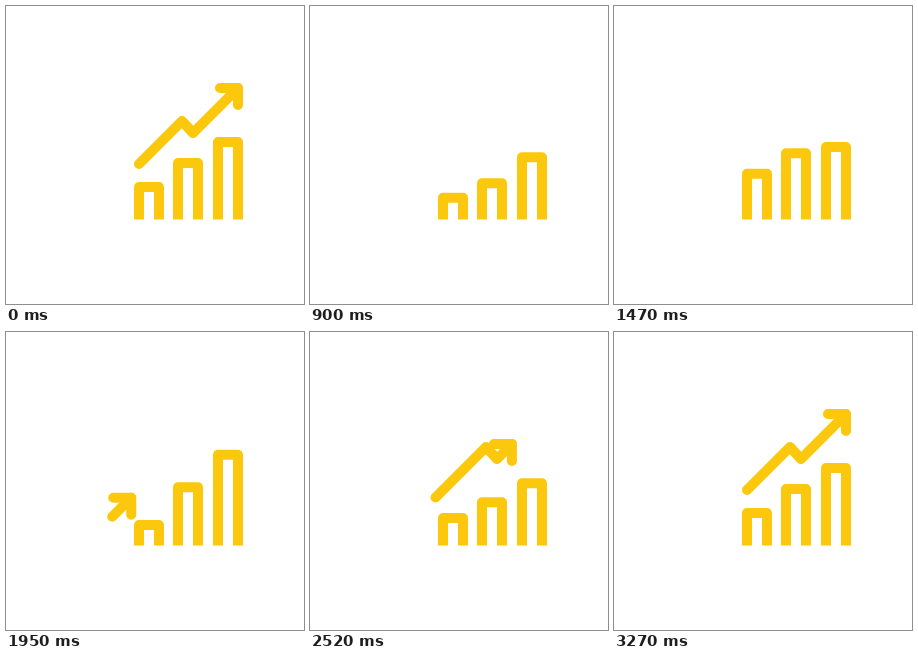
Recreate the animation shown at these times as an HTML page. Size 298 px wide and 298 px high, loop 3.6 s.

```html
<!DOCTYPE html>
<html lang="en">
<head>
<meta charset="utf-8">
<title>Growth chart</title>
<style>
  html, body { margin: 0; height: 100%; overflow: hidden; background: #fff; }
  svg { display: block; width: 100vw; height: 100vh; }
  path { fill: none; stroke: #fcc80d; stroke-width: 10; stroke-linejoin: round; }
  #arrow path { stroke-linecap: round; }
</style>
</head>
<body>
<svg viewBox="0 0 298 298">
  <path class="bar"/>
  <path class="bar"/>
  <path class="bar"/>
  <g id="arrow">
    <path id="shaft" d="M106 185L176 115L187 127L268 46"/>
    <path id="head" d="M-18 0H0V17"/>
  </g>
</svg>
<script>
const LOOP = 3600, STEP = 30, LAG = 240;
const $ = id => document.getElementById(id);
const arrow = $('arrow'), shaft = $('shaft'), head = $('head');
const barPaths = document.querySelectorAll('.bar');

// left and top of each bar's centre line at rest
const bars = [[133, 181], [172, 157], [212, 136]];
// time and vertical offset of the bars' shared wave
const wave = [[0, 0], [630, 20.5], [1400, -14], [2110, 16], [2760, 0]];

// distances along the shaft's route
const END = shaft.getTotalLength();
const REST_TAIL = 38.2, REST_TIP = 178.9, ENTRY_TIP = 26;
const EXIT_END = 780, ENTRY = 1900, ENTRY_END = 2850;

const mix = (a, b, k) => a + (b - a) * k;

function ease(t, from, to) {
  const x = Math.min(1, Math.max(0, (t - from) / (to - from)));
  return x * x * (3 - 2 * x);
}

function offset(t) {
  let y = 0;
  for (let i = 1; i < wave.length; i++) {
    const [t0, y0] = wave[i - 1], [t1, y1] = wave[i];
    y += (y1 - y0) * ease(t, t0, t1);
  }
  return y;
}

function drawArrow(t) {
  const visible = t < EXIT_END || t >= ENTRY;
  arrow.style.display = visible ? '' : 'none';
  if (!visible) return;
  let tail, tip;
  if (t < EXIT_END) {
    const k = ease(t, 0, EXIT_END);
    tail = mix(REST_TAIL, END, k);
    tip = mix(REST_TIP, END, k);
  } else {
    const k = ease(t, ENTRY, ENTRY_END);
    tail = mix(0, REST_TAIL, k);
    tip = mix(ENTRY_TIP, REST_TIP, k);
  }
  const p = shaft.getPointAtLength(tip);
  shaft.setAttribute('stroke-dasharray', `${tip - tail} 999`);
  shaft.setAttribute('stroke-dashoffset', -tail);
  head.setAttribute('transform', `translate(${p.x} ${p.y})`);
}

function draw(now) {
  const t = Math.floor(now % LOOP / STEP) * STEP;
  bars.forEach(([x, top], i) => {
    const y = top + offset(t - i * LAG);
    barPaths[i].setAttribute('d', `M${x} 213.5V${y}h20V213.5`);
  });
  drawArrow(t);
}

const start = performance.now();
function frame() {
  draw(performance.now() - start);
  requestAnimationFrame(frame);
}
frame();
</script>
</body>
</html>
```
